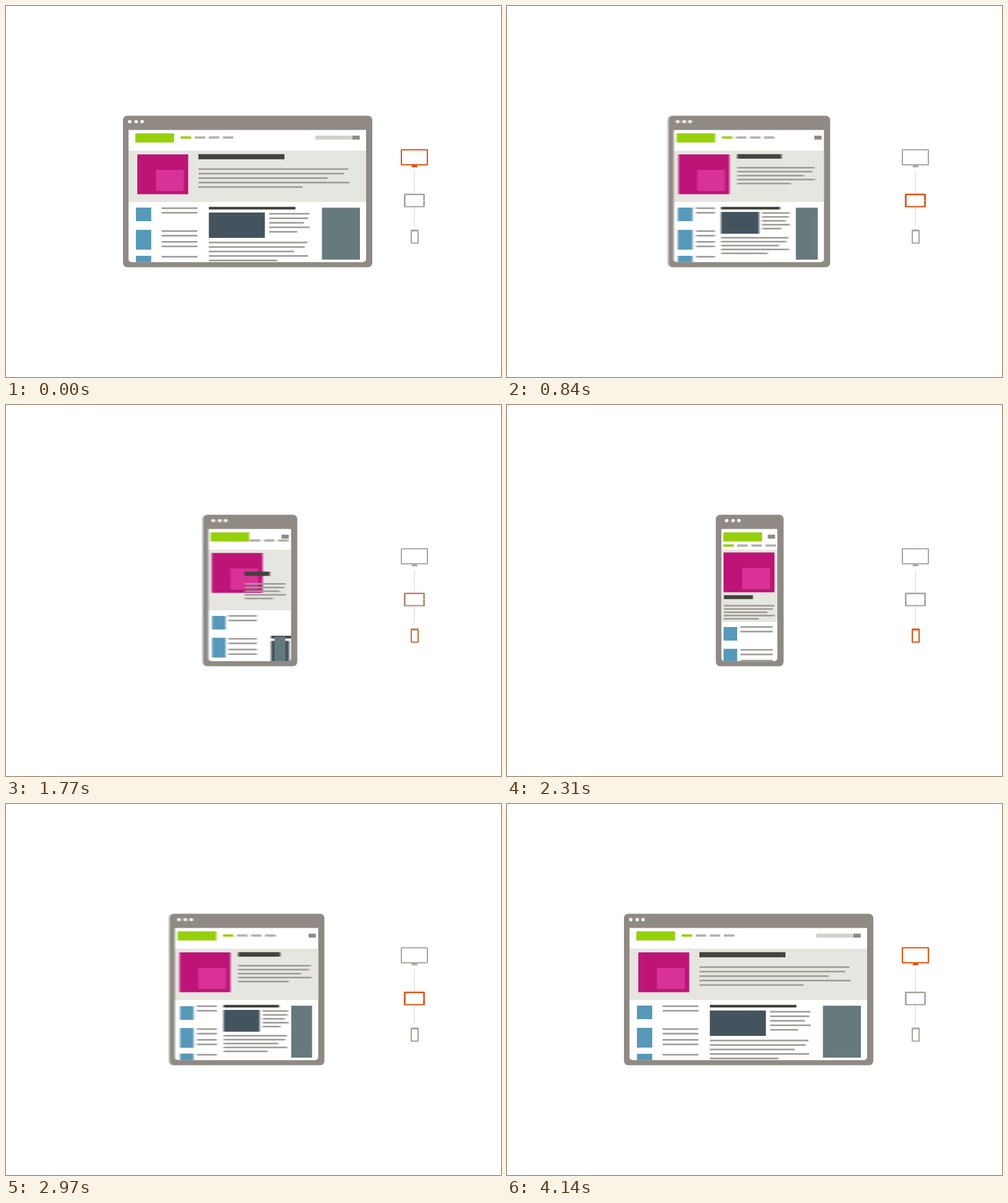
Write an HTML page with a canvas that moves like this. It is 800 by 600 pixels and loops after 4500 ms.

```html
<!DOCTYPE html>
<html lang="en">
<head>
<meta charset="utf-8">
<title>Responsive layout</title>
<style>
  html, body { margin: 0; width: 100%; height: 100%; overflow: hidden; background: #fff; }
  canvas { display: block; width: 800px; height: 600px; }
</style>
</head>
<body>
<canvas id="stage" width="800" height="600"></canvas>
<script>
const LOOP = 4500, STEP = 30, MOVE = 540, FADE = 560;
const START = { narrow: 323, shrink: 885, phone: 1445, tablet: 2550, grow: 3085, wide: 3595 };
const LINE_WIDTHS = [.993, .965, .856, 1, .69];
const GREY = [168, 165, 157], ORANGE = [231, 76, 4];
const LIME = '#96d00b', FRAME = '#8f8a83', DARK = '#42423e', INK = '#9d9b95';

const stage = document.getElementById('stage').getContext('2d');
const layer = document.createElement('canvas');
layer.width = 800;
layer.height = 600;
const c = layer.getContext('2d');

const clamp = v => Math.min(1, Math.max(0, v));
const mix = (a, b, k) => a + (b - a) * k;
const quad = k => k < .5 ? 2 * k * k : 1 - 2 * (1 - k) ** 2;
const cubic = k => k < .5 ? 4 * k ** 3 : 1 - 4 * (1 - k) ** 3;
const ramp = (t, start, length) => clamp((t - start) / length);
const between = (t, from, to, length = MOVE) => ramp(t, from, length) - ramp(t, to, length);

function poseAt(t) {
  const a = between(t, START.narrow, START.wide);
  const b = between(t, START.phone, START.tablet);
  // The left edge follows a steeper curve than the right one.
  const x0 = 189 + 71.5 * cubic(a) + 77 * cubic(b);
  const x1 = 592 - 70 * quad(a) - 75 * quad(b);
  const extra = x1 - x0 - 261.5;
  return {
    x0, x1,
    wide: clamp(extra / 141.5),
    slim: clamp(-extra / 152),
    stack: quad(clamp((b - .25) / .75)),
    tight: quad(between(t, START.shrink, START.grow, 520)),
    moving: a % 1 > 0 || b % 1 > 0
  };
}

function fill(color, x, y, w, h) {
  c.fillStyle = color;
  c.fillRect(x, y, w, h);
}

function rounded(color, x, y, w, h, r) {
  c.fillStyle = color;
  c.beginPath();
  c.roundRect(x, y, w, h, r);
  c.fill();
}

const line = (x, y, w) => fill(INK, x, y - 1.3, w, 2.6);
const text = (x, y, gap, w) => LINE_WIDTHS.forEach((part, i) => line(x, y + i * gap, w * part));

// All sizes depend on how wide or slim the window is and how far it has stacked.
function drawWindow(pose, shift) {
  const { x1, wide, slim, stack } = pose;
  const x0 = pose.x0 + shift;
  const screen = x1 - x0 - 19;
  const logo = x0 + 13.5 + 6.5 * wide - 1.5 * slim;

  fill('#fff', 0, 0, 800, 600);
  rounded(FRAME, x0, 177.5, x1 - x0, 245, 7);
  for (const dx of [0, 10.4, 19.9]) {
    rounded('#fff', x0 + 12.7 - 4.5 * wide + 2 * slim + dx, 184.2, 5.6, 5.6, 2.8);
  }
  c.save();
  rounded('#fff', x0 + 9, 200.5, screen, 213.8, [0, 0, 5, 5]);
  c.clip();

  drawHeader(pose, logo);
  fill('#e6e6e0', x0 + 9, 234, screen, 83 + 34 * stack);
  drawHero(pose, logo);
  drawList(pose, x0, logo);
  drawArticle(pose, x0);
  c.restore();
}

function drawHeader({ x1, wide, stack }, logo) {
  fill(LIME, logo, 206, 62.7, 14.7);
  for (let i = 0; i < 4; i++) {
    fill(i ? '#b3b1ac' : LIME, logo + 73.3 * (1 - stack) + 22.7 * i, 210.8 + 14.6 * stack, 17, 3.8);
  }
  c.globalAlpha = clamp(wide / .15);
  fill('#d0d1c9', x1 - 92, 209.7, 61, 6.4);
  c.globalAlpha = 1;
  fill(FRAME, x1 - 25.5 - 6.5 * wide, 209.7, 11.7, 6.4);
}

function drawHero({ wide, slim, stack }, logo) {
  const art = logo + 3.2 - 2.7 * stack;
  const top = 240 - 1.5 * stack;
  fill('#be1478', art, top, 82.3, 64.4);
  fill('#d83296', art + 30, top + 25, 45.2, 34.2);

  const x = logo + mix(98 + 4 * wide, 1, stack);
  fill(DARK, x, 239.6 + 68 * stack, mix(71.5 - 50 * slim, 47, stack) + 67.5 * wide, 7.3 + wide - stack);
  text(x, 261.5 + 2.3 * wide + 63.1 * stack, 6.4 + .85 * wide - 1.1 * stack,
    mix(125.5 - 100 * slim, 82, stack) + 118.5 * wide);
}

function drawList({ wide, slim, stack, tight }, x0, logo) {
  const drop = 32 * stack;
  const tile = logo + 2 + 2 * tight - wide - 3.5 * stack;
  [22, 32, 32].forEach((h, i) =>
    fill('#5799b9', tile, 326 + 36 * i + 3 * i * (i - 1) + tight * (1 - i * .7) + drop, 24 - 2 * tight + .7 * wide, h));

  const x = x0 + 44.8 + 17.7 * wide - 5 * slim;
  const w = 30.8 + 27 * wide + 21.5 * slim;
  for (const y of [327, 364, 381.4]) {
    line(x, y + drop, w);
    line(x, y + 7.4 + drop, w);
  }
  line(x, 405.5 + drop, w);
}

function drawArticle({ x1, wide, slim, stack }, x0) {
  const x = x0 + 85.2 + 53.6 * wide + 35 * slim;
  const drop = 110 * stack;
  const picture = 61.6 + 29 * wide - 45 * slim;
  fill(DARK, x, 324.8 + drop, 95.5 + 44.5 * wide - 80 * slim, 4.3);
  fill('#44545e', x, 333 + wide + drop, picture, 35.3 + 5.7 * wide);
  text(x + picture + 4.7 + 2.2 * wide, 334.8 + 1.2 * wide + drop, 6.3 + wide, 45 + 20.5 * wide - 45 * slim);
  text(x, 374.8 + 7.7 * wide + drop, 6.3 + .95 * wide, 109.7 + 50.8 * wide - 90 * slim);

  const side = 35.4 + 26 * wide - 25 * slim;
  fill('#66797c', x1 - 20 + slim - side, 326.2 + drop, side, 84);
}

function tint(k) {
  return `rgb(${GREY.map((g, i) => Math.round(mix(g, ORANGE[i], k)))})`;
}

function device(color, x, y, w, h, sx, sy) {
  stage.fillStyle = color;
  stage.beginPath();
  stage.roundRect(x, y, w, h, 1.5);
  stage.rect(x + sx, y + sy, w - 2 * sx, h - sy - 2);
  stage.fill('evenodd');
}

function drawIcons(t) {
  const small = quad(between(t, START.narrow, START.wide, FADE));
  const tiny = quad(between(t, START.phone, START.tablet, FADE));
  stage.fillStyle = '#e0dfdd';
  stage.fillRect(659.4, 267, 1.5, 37);
  stage.fillRect(659.4, 325, 1.5, 31);

  device(tint(1 - small), 638, 231.5, 44, 26.2, 2, 2);
  stage.beginPath();
  stage.moveTo(657, 257);
  stage.lineTo(663.5, 257);
  stage.lineTo(665.5, 260.8);
  stage.lineTo(655, 260.8);
  stage.fill();

  device(tint(clamp(small - tiny)), 643, 303.6, 34, 22, 2.8, 2.4);
  stage.fillStyle = '#fff';
  stage.fillRect(675, 314, 1, 1);

  device(tint(tiny), 654, 361.6, 13, 23, 2, 2.8);
}

function draw(t) {
  const pose = poseAt(t);
  // Moving parts smear sideways by a few pixels.
  const shifts = pose.moving ? [-2, -1, 0, 1, 2] : [0];
  shifts.forEach((shift, i) => {
    drawWindow(pose, shift);
    stage.globalAlpha = 1 / (i + 1);
    stage.drawImage(layer, 0, 0);
  });
  stage.globalAlpha = 1;
  drawIcons(t);
}

const begin = performance.now();
function tick() {
  const t = (performance.now() - begin) % LOOP;
  draw(Math.floor(t / STEP) * STEP);
  requestAnimationFrame(tick);
}
tick();
</script>
</body>
</html>
```
